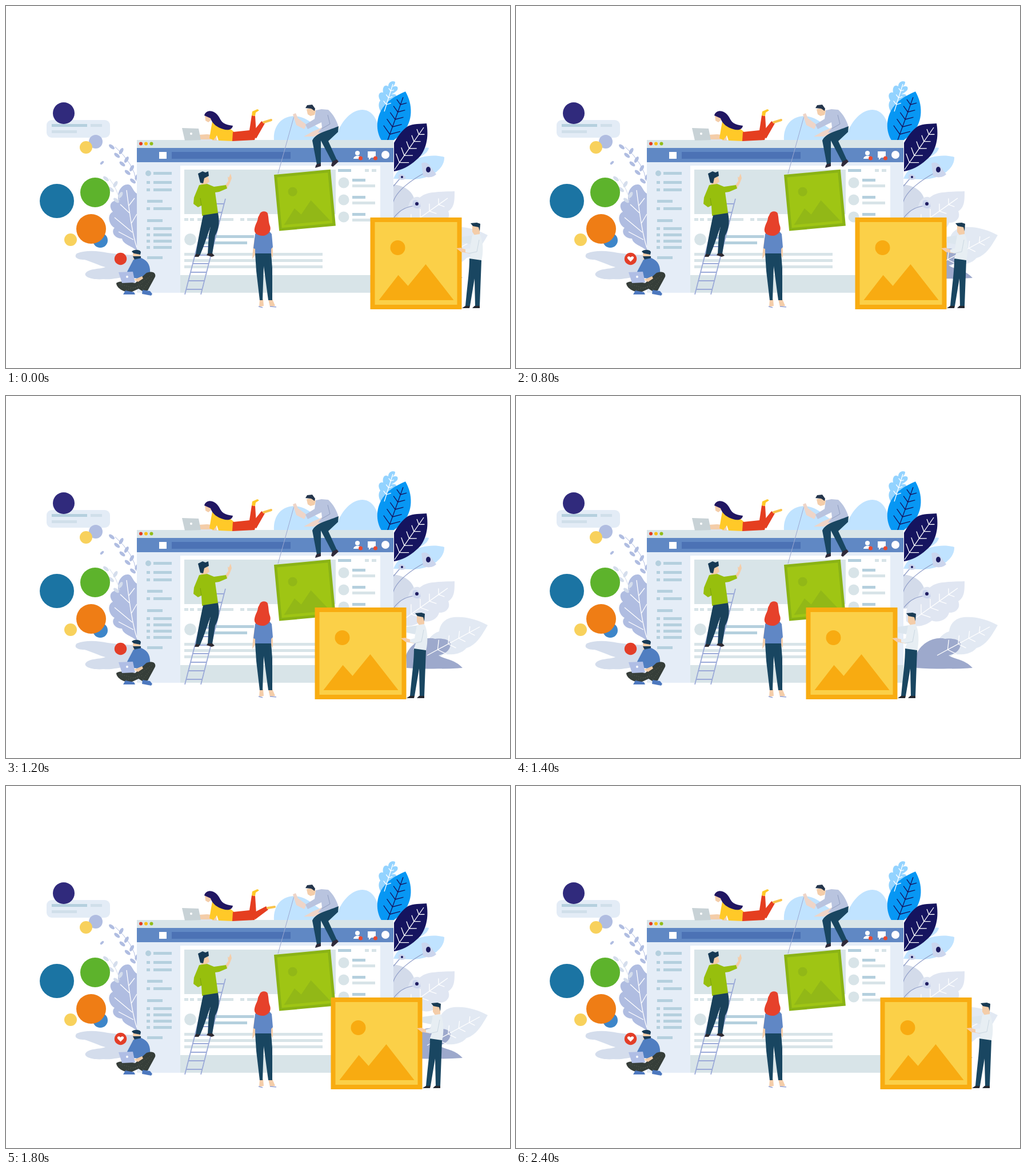
Animation, 882 px wide and 635 px high, one loop 7400 ms. Source, as an HTML page:

```html
<!DOCTYPE html>
<html lang="en">
<head>
<meta charset="utf-8">
<title>Building a page</title>
<style>
  html, body { margin: 0; width: 100%; height: 100%; overflow: hidden; background: #fff; }
  svg { display: block; width: 100vw; height: 100vh; }
</style>
</head>
<body>
<svg viewBox="0 0 882 635" xmlns="http://www.w3.org/2000/svg">
  <defs>
    <g id="picture">
      <path fill="var(--edge)" d="M0 0H160V161H0Z"/>
      <path fill="var(--face)" d="M8 8H152V153H8Z"/>
      <circle cx="48" cy="53" r="13" fill="var(--mark)"/>
      <path fill="var(--mark)" d="M15 145L49 101L66 120L97 82L146 145Z"/>
    </g>
  </defs>

  <g id="clouds" fill="#c0e3ff">
    <path d="M469 236C467 212 481 193 505 193C531 195 540 213 558 220L580 222C588 202 604 182 624 182C645 183 652 205 658 236Z"/>
    <path d="M678 303C690 272 737 256 767 265C768 286 742 306 705 304Z"/>
    <path d="M708 268C718 252 731 247 740 249C738 258 728 266 708 268Z"/>
  </g>

  <g id="foliage-right">
    <path fill="#93d3ff" d="M659 189C651 181 651 170 655 166C649 156 654 150 660 152C658 141 664 137 669 141C669 134 675 130 681 133C681 138 678 140 676 142C684 139 687 142 685 147C681 152 677 153 675 155C682 153 685 157 682 162C677 169 672 170 669 171C674 173 674 178 670 182Z"/>
    <path fill="#0797f4" d="M699 150C712 172 713 203 694 222C685 232 675 238 663 243C648 228 646 203 656 184C665 167 682 157 699 150Z"/>
    <path fill="#15145f" d="M736 206C741 235 733 258 718 270C706 281 692 288 679 290V240C686 228 692 219 703 211C713 206 725 207 736 206Z"/>
    <path fill="#d3dbea" d="M678 313C698 315 713 326 715 342C717 361 699 373 678 373Z"/>
    <path fill="#e0e6f2" d="M683 395C680 372 690 354 704 354C704 342 715 331 724 336C735 326 750 326 785 325C785 342 785 353 774 360C779 372 769 381 758 380C754 394 738 398 728 394C714 405 696 408 683 395Z"/>
    <path fill="#e2e9f3" d="M727 456C733 429 747 416 758 413C759 399 770 389 784 388C805 386 827 393 843 402C832 421 823 437 806 442C794 456 775 453 765 453C752 465 737 466 727 456Z"/>
    <path fill="#9da9cc" d="M700 455C708 433 733 421 751 426C768 424 779 429 778 436C776 451 761 454 757 455C767 462 786 462 799 477C766 479 729 479 701 477Z"/>
    <g fill="none" stroke="#8d9bc7" stroke-width="1.2">
      <path d="M677 346C682 323 715 302 734 292M678 316L690 302M679 371C691 355 704 352 717 350"/>
    </g>
    <path fill="#cbd5ed" d="M727 276C739 270 742 282 753 295C748 301 737 302 730 298Z"/>
    <path fill="#cbd5ed" d="M687 296C694 293 698 297 700 302C696 306 689 306 687 302ZM712 342C718 337 723 343 726 351C722 358 714 355 711 351Z"/>
    <g fill="#1d1b60"><ellipse cx="739" cy="287" rx="4" ry="5"/><circle cx="693" cy="300" r="2"/><circle cx="719" cy="347" r="3"/></g>
  </g>

  <g id="foliage-left">
    <path fill="#d4ddec" d="M226 478C207 471 192 481 171 479C151 481 136 475 139 469C145 460 164 462 174 458C162 455 149 448 137 445C124 445 118 440 124 434C139 428 160 429 178 433L203 436L229 437Z"/>
    <path fill="#b0bde1" d="M229 429C218 420 205 418 203 408C190 408 183 396 190 389C180 384 176 366 187 361C178 350 184 340 197 341C193 326 203 312 214 313C221 314 222 325 229 329Z"/>
    <path fill="none" stroke="#fff" stroke-width="1.3" d="M211 323C216 362 221 400 229 424M215 350L225 337M216 363L200 348M219 382L229 365M221 397L190 371M223 410L197 396"/>
  </g>

  <g id="window">
    <path fill="#d8e4e8" d="M229 235H678V249H229Z"/>
    <circle cx="236" cy="241.500" r="3" fill="#e13c27"/>
    <circle cx="245" cy="241.500" r="3" fill="#f7bd16"/>
    <circle cx="254.500" cy="241.500" r="3" fill="#93bd17"/>
    <path fill="#6088c4" d="M229 249H678V274H229Z"/>
    <path fill="#4c72b5" d="M290 256H498V268H290Z"/>
    <path fill="#fff" d="M268 256H281V268H268Z"/>
    <path fill="#e5edf7" d="M229 274H678V503H229Z"/>
    <path fill="#fff" d="M305 280H655V472H305Z"/>
    <path fill="#d8e4e8" d="M305 472H678V503H305ZM312 287H577V365H312Z"/>
    <g fill="#fff">
      <circle cx="615" cy="258" r="4"/><path d="M608 268C609 261 621 261 622 268Z"/>
      <path d="M633 255H647V266H639L635 270V266H633Z"/><circle cx="664" cy="261" r="7"/>
    </g>
    <g fill="#e94b30"><circle cx="620.500" cy="267" r="3.500"/><circle cx="646.500" cy="267" r="3.500"/></g>
    <g id="rows"></g>
  </g>

  <g id="badges">
    <rect x="71" y="200" width="111" height="31" rx="9" fill="#e3ecf6"/>
    <path fill="#b5d0de" d="M80 207H142V212H80Z"/>
    <path fill="#d0dfea" d="M148 207H168V212H148ZM80 218H124V223H80Z"/>
  </g>

  <g id="ladder" fill="none" stroke="#9baad8" stroke-width="1.800"></g>

  <g id="climber">
    <path fill="#f4cda9" d="M344 297L353 297L356 308L351 312L350 317L341 316Z"/>
    <path fill="#173a55" d="M336 294L344 290L349 292L354 290L355 298L347 302L345 311L340 310Z"/>
    <path fill="#f4cda9" d="M382 317L389 307L388 299L390 301L393 294L395 302L392 310L386 321Z"/>
    <path fill="#97bf0d" d="M338 314L352 312L364 317L385 314L387 320L373 326L366 327L371 363L365 370L343 368L342 350L336 353L328 347L329 336Z"/>
    <path fill="none" stroke="#7ba10b" d="M342 350L340 337"/>
    <path fill="#1a415b" d="M345 367L371 363C374 378 373 390 366 403L361 435L353 435L355 400L358 387C352 403 347 420 340 436L332 436C336 411 340 390 345 367Z"/>
    <path fill="#302b32" d="M332 435L340 436L337 440L330 440ZM353 434L361 434L365 438L360 440L351 437Z"/>
  </g>

  <path fill="none" stroke="#9da8d0" d="M505 190L476 294"/>
  <use href="#picture" transform="translate(469 296) rotate(-5.300) scale(.62 .615)" style="--edge:#8ab315;--face:#9fc514;--mark:#92b817"/>

  <g id="sitter">
    <path fill="#f4cda9" d="M526 181L537 178L542 184L540 191L533 193L528 190Z"/>
    <path fill="#eed5c8" d="M502 190L507 188L511 197L526 208L522 216L508 209ZM521 229L537 220L558 211L562 218L539 229Z"/>
    <path fill="#24364d" d="M524 179L527 174L536 173L541 180L540 184L534 180Z"/>
    <path fill="#b9c4df" d="M542 183L552 181L564 182C573 190 579 202 582 212L560 223L546 222L553 213L552 204L528 216L524 208L540 198Z"/>
    <path fill="none" stroke="#8e9cc0" d="M563 191L567 207L553 215"/>
    <path fill="#194661" d="M582 211L581 221L564 237L579 270L571 274L551 236L551 278L544 278L536 236C542 223 559 220 582 211Z"/>
    <path fill="#302b3a" d="M544 277L551 276L551 281L541 284L542 280ZM571 273L579 269L582 273L572 282L569 280Z"/>
  </g>

  <g id="reader">
    <path fill="#f4cda9" d="M348 191L356 190L360 199L354 204L349 201ZM336 226L352 225L368 227L369 236L341 235Z"/>
    <path fill="#ffc928" d="M361 202L374 205C385 211 396 217 399 221L397 237L372 236L369 227L363 235L356 232Z"/>
    <path fill="#211762" d="M347 192C349 183 360 182 367 188C375 194 374 203 384 207C389 209 393 209 397 210C396 217 388 219 380 216C370 213 361 207 358 197Z"/>
    <path fill="#c8d2d6" d="M308 214L337 215L341 235L313 236Z"/>
    <path fill="#dce3eb" d="M341 234H361V237H341Z"/>
    <circle cx="324" cy="224" r="2" fill="#fff"/>
    <path fill="#e53e20" d="M397 221L426 218L430 192L436 193L438 224L435 235L396 237Z"/>
    <path fill="#ffc928" d="M430 192L431 185L440 181L443 183L437 187L436 193Z"/>
    <path id="shin" fill="#e53e20"/>
    <path id="foot" fill="none" stroke="#f9c34a" stroke-width="4" stroke-linecap="round"/>
  </g>

  <g id="viewer">
    <path fill="#f4cda9" d="M435 406L439 410L436 436L431 444L432 429ZM461 407L465 408L467 429L467 442L463 435ZM444 514H450L451 526L443 528ZM459 514H466L471 526L462 528Z"/>
    <path fill="#6087c5" d="M441 393L459 393L465 400L467 423L464 426L464 435L436 435L436 426L433 425L436 400Z"/>
    <path fill="#194661" d="M436 434H464L466 460L466 516L459 516L451 456L449 516L444 516L438 465Z"/>
    <path fill="#e6412b" d="M444 365C446 359 456 359 458 364C460 372 459 378 462 386C465 395 458 403 449 403C440 403 433 398 435 390C437 381 441 377 441 371Z"/>
    <path fill="none" stroke="#94a5da" stroke-width="1.500" d="M442 527L449 529M462 527L473 528"/>
  </g>

  <g id="coder">
    <circle cx="200.500" cy="443.500" r="10.700" fill="#e33e28"/>
    <path id="heart" fill="#fff" d="M200.500 448.500L196.500 444.500C192 440 198 437.500 200.500 441C203 437.500 209 440 204.500 444.500Z"/>
    <path fill="#f4cda9" d="M222 432L235 432L235 445L223 446Z"/>
    <path fill="#183c57" d="M220 431C223 426 236 427 236 432L235 436L224 434ZM222 439L236 439C237 448 231 450 226 447Z"/>
    <path fill="#507ec1" d="M223 445L237 442C250 448 253 457 252 471L244 480L217 476L212 466Z"/>
    <path fill="#363e39" d="M193 486C200 481 216 484 226 486L246 468C256 464 263 468 261 475L248 499L240 501L232 496L217 503L206 500C199 497 193 492 193 486Z"/>
    <path fill="none" stroke="#62695a" stroke-dasharray="1 3" d="M199 488L225 495L255 472M210 498L240 490M239 497L256 477"/>
    <path fill="#b0bee5" d="M197 467L222 466L226 485L203 486Z"/>
    <path fill="#f4cda9" d="M224 480L238 474L240 478L231 484Z"/>
    <circle cx="212" cy="475" r="2" fill="#fff"/>
    <path fill="#4d78bf" d="M209 499L224 502L226 506L205 506ZM239 498L252 500L256 505L254 508L238 505Z"/>
  </g>

  <g id="mover">
    <path fill="#dce6ee" d="M819 402L798 405L798 415L813 418Z"/>
    <path fill="#f4cda9" d="M788 425L797 425L812 429L811 434L794 431ZM816 385L829 385L829 401L820 402L816 396Z"/>
    <path fill="#193b54" d="M813 381L824 380L830 382L829 395L827 388L817 386Z"/>
    <path fill="#e7eef3" d="M816 402L829 400C835 410 836 430 832 447L810 445L814 434L804 432L804 427L812 425Z"/>
    <path fill="none" stroke="#cbd8e2" d="M828 410L824 431L810 434"/>
    <path fill="#194661" d="M811 443L832 446L829 526L821 526L820 478L812 526L804 526C807 492 811 467 811 443Z"/>
    <path fill="#25272f" d="M804 526L812 526L811 530L798 530ZM820 526L829 526V530H816Z"/>
    <use href="#picture" x="637.500" y="371" style="--edge:#f8ac11;--face:#fbd048;--mark:#f8ab11"/>
    <path fill="#f4cda9" d="M788 425L796 424L803 429L797 432Z"/>
  </g>
</svg>
<script>
const $ = id => document.getElementById(id);
const add = (id, markup) => $(id).insertAdjacentHTML("beforeend", markup);
const bar = (x, y, w, fill = "#d8e4e8", h = 5) => add("rows", `<rect x="${x}" y="${y}" width="${w}" height="${h}" fill="${fill}"/>`);
const dot = (id, x, y, r, fill) => add(id, `<circle cx="${x}" cy="${y}" r="${r}" fill="${fill}"/>`);

// A midrib with pairs of slanted side veins.
function veins(id, [x1, y1], [x2, y2], count, size, color) {
  const dx = x2 - x1, dy = y2 - y1, length = Math.hypot(dx, dy);
  const ux = dx / length, uy = dy / length;
  let d = `M${x1} ${y1}L${x2} ${y2}`;
  for (let i = 1; i <= count; i++) {
    const k = i / (count + 1), s = size * (1 - k * .55);
    const x = x1 + dx * k, y = y1 + dy * k;
    for (const side of [-1, 1])
      d += `M${x} ${y}l${s * (ux * .7 - uy * side)} ${s * (uy * .7 + ux * side)}`;
  }
  add(id, `<path d="${d}" fill="none" stroke="${color}" stroke-width="1.3"/>`);
}

// Small leaves on alternating sides of a stem.
function sprig([x1, y1], [x2, y2], count, fill) {
  add("foliage-left", `<path d="M${x1} ${y1}Q${x1 - 4} ${(y1 + y2) / 2} ${x2} ${y2}" fill="none" stroke="${fill}"/>`);
  for (let i = 0; i < count; i++) {
    const k = i / (count - 1), side = i % 2 ? 1 : -1;
    const x = x1 + (x2 - x1) * k + side * 6, y = y1 + (y2 - y1) * k;
    add("foliage-left", `<ellipse cx="${x}" cy="${y}" rx="3" ry="6" fill="${fill}" transform="rotate(${side * 40 - 10} ${x} ${y})"/>`);
  }
}

const blue = "#b5d0de";
veins("foliage-right", [667, 238], [695, 160], 5, 17, "#15145f");
veins("foliage-right", [680, 287], [731, 213], 5, 15, "#fff");
veins("foliage-right", [662, 185], [677, 137], 3, 8, "#fff");
veins("foliage-right", [693, 394], [773, 337], 4, 16, "#fff");
veins("foliage-right", [737, 455], [829, 405], 4, 16, "#fff");
sprig([228, 307], [191, 247], 9, "#b0bde1");
sprig([199, 341], [181, 303], 5, "#d4ddec");
add("foliage-left", '<ellipse cx="168" cy="275" rx="2" ry="4" fill="#b0bde1" transform="rotate(45 168 275)"/>');

dot("rows", 249, 293.5, 5, blue);
bar(258, 291, 32, blue);
for (const y of [307, 320, 353, 388, 399, 410, 421]) {
  bar(246, y, 6, blue);
  bar(258, y, 32, blue);
}
for (const y of [340, 374, 439]) bar(247, y, 27, blue);
for (const [x, w] of [[312, 7], [322, 7], [335, 63], [410, 7], [422, 34]]) bar(x, 372, w);
dot("rows", 322.5, 409.5, 10.5, "#d8e4e8");
bar(340, 402, 94, blue);
bar(340, 413, 82, blue);
for (const y of [433, 444, 455]) bar(312, y, 242);
bar(581, 286, 23, blue);
bar(628, 286, 7);
bar(640, 286, 8);
for (let y = 310; y < 380; y += 30) {
  dot("rows", 591, y, 9.5, "#d8e4e8");
  bar(606, y - 7, 23, blue);
  bar(606, y + 3, 40);
}

for (const [x, y, r, fill] of [
  [157, 238, 12, "#b0bde1"], [140, 248, 11, "#f8d15c"], [113, 410, 11, "#f8d15c"], [165, 411, 13, "#3e86c9"],
  [101, 188, 19, "#302a7c"], [89, 342, 30, "#1b74a3"], [156, 327, 26, "#5db32c"], [149, 391, 26, "#ef7d15"]
]) dot("badges", x, y, r, fill);

let rails = "M313 506L356 338M341 506L384 338";
for (let y = 497; y > 340; y -= 15) {
  const x = 313 + (506 - y) * .256;
  rails += `M${x} ${y}h28`;
}
add("ladder", `<path d="${rails}"/>`);

const STEP = 200, LOOP = 7400;
const boxLeft = [638, 638, 638, 618, 594, 569, 541, 508, 541, 569, 594, 618, 638];
const kick = [0, 1, 2, 1, 0, 0, 0, 0, 0, 1, 2, 1, 0];
const poses = [
  { ankle: [450, 204], toe: [464, 200] },
  { ankle: [457, 214], toe: [470, 212] },
  { ankle: [458, 226], toe: [469, 225] }
];

function drawLeg({ ankle: [ax, ay], toe: [tx, ty] }) {
  const dx = ax - 433, dy = ay - 229, length = Math.hypot(dx, dy);
  const nx = -dy / length, ny = dx / length;
  const at = (x, y, w) => `${x + nx * w} ${y + ny * w}`;
  $("shin").setAttribute("d", `M${at(433, 229, -6)}L${at(ax, ay, -3.5)}L${at(ax, ay, 3.5)}L${at(433, 229, 6)}Z`);
  $("foot").setAttribute("d", `M${ax + 1} ${ay}L${tx} ${ty}`);
}

function render(now) {
  const time = now % LOOP;
  const step = Math.min(Math.floor(time / STEP), boxLeft.length - 1);
  $("mover").setAttribute("transform", `translate(${boxLeft[step] - 638} 0)`);
  $("heart").setAttribute("visibility", time < 400 || (time >= 1200 && time < 1800) ? "hidden" : "visible");
  drawLeg(poses[kick[step]]);
}

function tick() {
  render(performance.now());
  requestAnimationFrame(tick);
}
tick();
</script>
</body>
</html>
```
